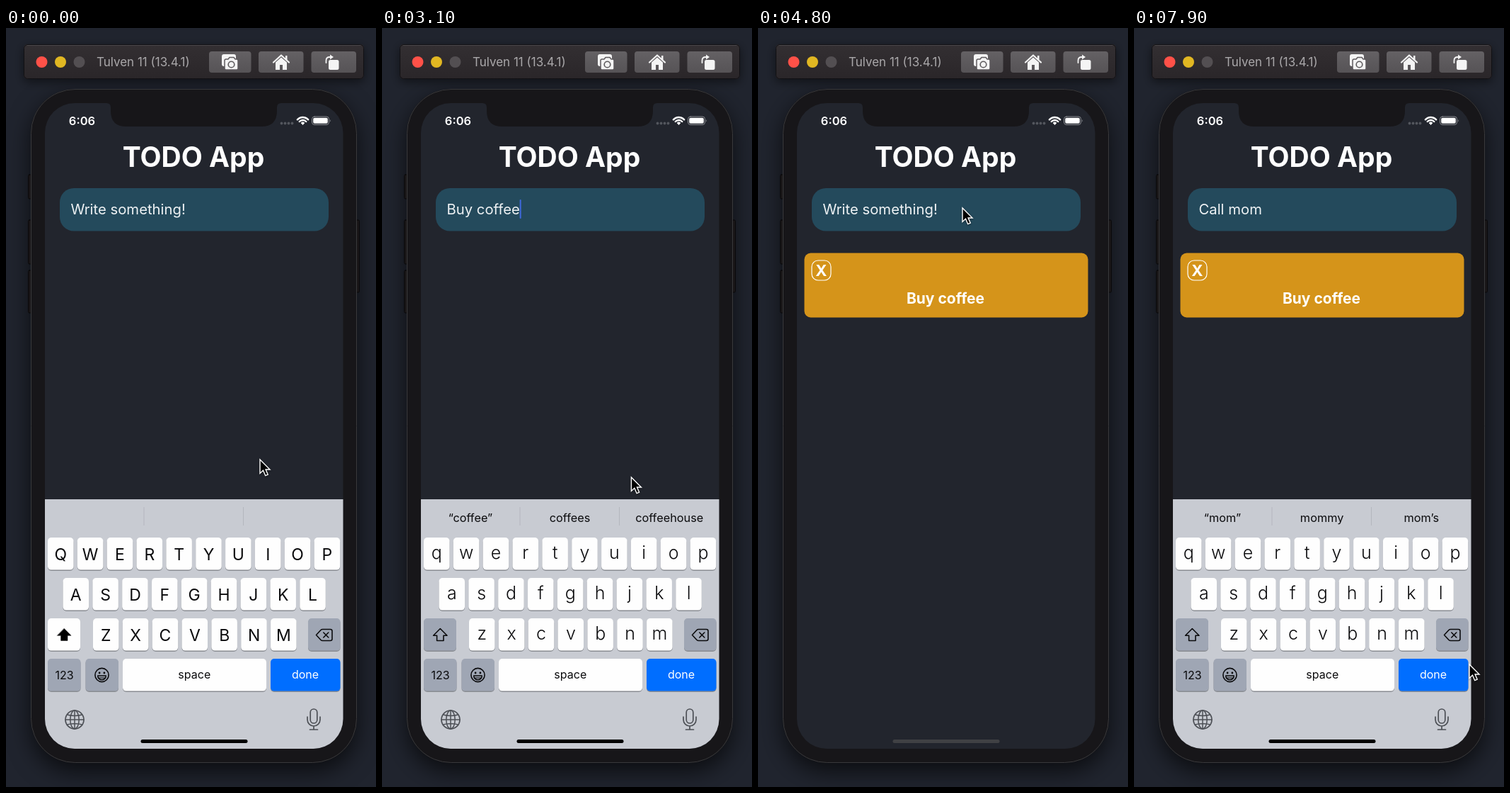
Write an HTML page with a canvas that moves like this. It is 523x1071 px and loops after 8 s.

```html
<!DOCTYPE html>
<html lang="en">
<head>
<meta charset="utf-8">
<title>TODO App</title>
<style>
html, body { margin: 0; width: 100%; height: 100%; overflow: hidden; background: #20242e; }
canvas { display: block; width: 523px; height: 1071px; }
</style>
</head>
<body>
<canvas id="stage"></canvas>
<script>
const W = 523, H = 1071, LOOP = 8000, TICK = 100;
const canvas = document.getElementById('stage');
const ctx = canvas.getContext('2d');
const dpr = window.devicePixelRatio || 1;
canvas.width = W * dpr;
canvas.height = H * dpr;

const BEZEL = '#171619', SCREEN = '#22252d', INK = '#0b0b0d', GLYPH = '#4d5056';
const FOCUS = 5150, PRESS = 3700, SUBMIT = 3950;
const KB_TOP = 665, KB_HEIGHT = 352;

// time, text, suggestions, highlighted middle candidate
const typing = [
  [-700, '', ''],
  [700, 'B', '“B”|But|By'],
  [900, 'Bu', '“Bu”|But|Bud'],
  [1100, 'Buy', '“Buy”|Buying|Buyer'],
  [1400, 'Buy ', 'a|the|it'],
  [1900, 'Buy c', '“c”|can|could'],
  [2050, 'Buy co', '“co”|could|come'],
  [2200, 'Buy cof', '“cof”|cod|', true],
  [2450, 'Buy coff', '“coff”|coffee|coffees', true],
  [2650, 'Buy coffe', '“coffe”|coffee|coffees', true],
  [2860, 'Buy coffee', '“coffee”|coffees|coffeehouse'],
  [SUBMIT, '', ''],
  [FOCUS, '', ''],
  [5800, 'C', '“C”|Can|Call'],
  [6000, 'Ca', '“Ca”|Can|Call'],
  [6150, 'Cal', '“Cal”|Call|Called'],
  [6300, 'Call', '“Call”||'],
  [6600, 'Call ', 'me|the|you'],
  [6900, 'Call m', '“m”|me|my'],
  [7050, 'Call mo', '“mo”|mom|more'],
  [7200, 'Call mom', '“mom”|mommy|mom’s']
];

// time, x, y of the pointer tip
const pointer = [
  [0, 359, 609], [900, 316, 509], [2800, 316, 509], [3600, 431, 904],
  [4100, 431, 904], [4700, 289, 254], [4800, 289, 254], [5200, 302, 265],
  [5500, 302, 265], [6400, 304, 268], [7200, 304, 268], [7700, 478, 896], [7900, 474, 898]
];

const clamp = v => Math.max(0, Math.min(1, v));
const smooth = v => v * v * (3 - 2 * v);

function box(x, y, w, h, r, fill, stroke, line = 1) {
  ctx.beginPath();
  ctx.roundRect(x, y, w, h, r);
  paint(fill, stroke, line);
}

function paint(fill, stroke, line = 1) {
  if (fill) { ctx.fillStyle = fill; ctx.fill(); }
  if (stroke) { ctx.strokeStyle = stroke; ctx.lineWidth = line; ctx.stroke(); }
}

function dot(x, y, r, fill, stroke, line) {
  ctx.beginPath();
  ctx.arc(x, y, r, 0, Math.PI * 2);
  paint(fill, stroke, line);
}

function shape(d, fill, stroke, line = 1) {
  const p = new Path2D(d);
  if (fill) { ctx.fillStyle = fill; ctx.fill(p); }
  if (stroke) { ctx.strokeStyle = stroke; ctx.lineWidth = line; ctx.stroke(p); }
}

function text(s, x, y, size, color, weight = 400, align = 'center') {
  ctx.font = `${weight} ${size}px Inter, Roboto, sans-serif`;
  ctx.textAlign = align;
  ctx.fillStyle = color;
  ctx.fillText(s, x, y);
}

function vertical(y0, y1, a, b) {
  const g = ctx.createLinearGradient(0, y0, 0, y1);
  g.addColorStop(0, a);
  g.addColorStop(1, b);
  return g;
}

function withShadow(blur, dy, alpha, draw) {
  ctx.save();
  ctx.shadowColor = `rgba(0,0,0,${alpha})`;
  ctx.shadowBlur = blur * dpr;
  ctx.shadowOffsetY = dy * dpr;
  draw();
  ctx.restore();
}

function toolbar() {
  withShadow(14, 4, 0.5, () => box(25, 23, 481, 49, 5, vertical(23, 72, '#332f32', '#2a2629')));
  box(25.5, 23.5, 480, 48, 5, null, '#121114');
  shape('M30 24.5H501', null, '#4a474a');
  dot(50.5, 48, 8, '#ff5148');
  dot(77, 48, 8, '#e1b722');
  dot(103.5, 48, 8, '#534f52');
  text('Tulven 11 (13.4.1)', 128, 54, 17, '#aaa8aa', 400, 'left');
  for (const [x, w] of [[287, 59.5], [357, 63.5], [431.5, 63.5]]) {
    box(x, 33, w, 30, 4, vertical(33, 63, '#646164', '#565356'));
  }
  const ico = '#f4f4f4', gap = '#5d5a5d';
  // camera
  box(305, 37, 20, 17, 3, ico);
  shape('M309 46q0-2 2-2h3l2-2.5h6l2 2.5h2q2 0 2 2v11q0 2-2 2h-15q-2 0-2-2z', ico, gap, 1.5);
  dot(318.5, 51.5, 4.3, null, gap, 1.6);
  // house
  shape('M378 48.5L389 38.5L400 48.5', null, ico, 2.2);
  shape('M381 48.5L389 41.5L397 48.5V59H391V52H387V59H381z', ico);
  shape('M395 39h2.5v6h-2.5z', ico);
  // rotate
  box(456, 45, 14.5, 14, 2.5, ico);
  shape('M452.5 49V46Q452.5 41 457.5 41H459', null, ico, 1.8);
  shape('M458 37.5L463 41L458 44.5z', ico);
}

function phone() {
  for (const [x, y, h] of [[31.5, 207, 34], [31.5, 271, 62], [31.5, 342, 60], [494.5, 271, 102]]) {
    box(x, y, 5, h, 1.5, '#242022', '#0d0c0e');
  }
  withShadow(32, 12, 0.65, () => box(35, 86, 461, 951, 62, BEZEL));
  box(35.5, 86.5, 460, 950, 62, null, '#39393b');
  box(55, 106, 421.5, 911, 42, SCREEN);
  shape('M142 105V106q6 0 6 6v5q0 22 22 22h191q22 0 22-22v-5q0-6 6-6V105z', BEZEL);
}

function statusBar() {
  text('6:06', 107.5, 136.7, 16.5, '#fff', 600);
  for (let i = 0; i < 4; i++) dot(389.5 + i * 5, 134.5, 1.9, '#53565d');
  const a = -Math.PI * 0.76, b = -Math.PI * 0.24;
  for (const r of [10.5, 6.5]) {
    ctx.beginPath();
    ctx.arc(419.5, 136.5, r, a, b);
    paint(null, '#fff', 2.4);
  }
  ctx.beginPath();
  ctx.moveTo(419.5, 137);
  ctx.arc(419.5, 136.5, 3.8, a, b);
  ctx.closePath();
  paint('#fff');
  box(432.5, 125, 24, 11.5, 3.5, null, '#8b8d92');
  box(434.2, 126.7, 20.6, 8.1, 2, '#fff');
  shape('M458 128.7q1.7 2 0 4z', '#8b8d92');
}

function caretAlpha(age) {
  const p = (age % 1000) / 1000;
  if (p < 0.45) return 1;
  return p < 0.9 ? clamp((0.6 - p) / 0.15) : (p - 0.9) / 0.1;
}

function app(t, step) {
  const [since, value] = step;
  text('TODO App', 265, 196, 39, '#fff', 700);
  box(76, 226, 380, 60.5, 20, '#244a5c');
  text(value || 'Write something!', 91.5, 263, 20.3, '#eef2f4', 400, 'left');
  if (t < SUBMIT || t >= FOCUS) {
    const w = value ? ctx.measureText(value).width : 0;
    ctx.globalAlpha = caretAlpha(t - since);
    box(91.3 + w, 242, 2, 27, 1, '#3f69dd');
    ctx.globalAlpha = 1;
  }
  if (t >= SUBMIT) {
    box(65.5, 317.5, 401, 91, 9, '#d5941a');
    box(76, 328, 27, 28, 9, null, '#fff', 1.2);
    text('X', 89.3, 350, 22, '#fff', 700);
    text('Buy coffee', 265, 388.5, 21, '#fff', 700);
  }
}

function key(x, y, w, fill = '#fefefe') {
  box(x, y + 1.4, w, 45.6, 5, '#898c92');
  box(x, y, w, 45.6, 5, fill);
}

function letters(row, x, y, upper) {
  [...row].forEach((c, i) => {
    const left = x + i * 41.85;
    key(left, y, 36.5);
    if (upper) text(c, left + 18.3, y + 31.5, 23, INK);
    else text(c.toLowerCase(), left + 18.3, y + 30, 25, INK, 300);
  });
}

function suggestions(t, [since, , words, hot]) {
  if (hot) box(195.5, 671, 140.5, 40, 5, '#e7e8ec');
  else for (const x of [194.5, 335]) box(x, 676, 1, 26, 0, '#b3b6bd');
  words.split('|').forEach((word, i) => {
    let color = INK;
    if (hot && i === 1) {
      const q = (t - since) / 150;
      color = ctx.createLinearGradient(250, 0, 278, 0);
      color.addColorStop(0, `rgba(11,11,13,${clamp(q)})`);
      color.addColorStop(1, `rgba(11,11,13,${clamp(q - 0.7)})`);
    }
    text(word, 125 + i * 140.6, 697, 16.3, color);
  });
}

function emoji(x, y) {
  dot(x, y, 9.6, null, INK, 1.6);
  dot(x - 3.4, y - 3, 1.4, INK);
  dot(x + 3.4, y - 3, 1.4, INK);
  ctx.beginPath();
  ctx.arc(x, y + 1, 5.8, 0, Math.PI);
  ctx.closePath();
  paint(null, INK, 1.5);
  shape(`M${x - 5} ${y + 4}H${x + 5}`, null, INK, 1);
}

function globe(x, y) {
  dot(x, y, 13, null, GLYPH, 1.7);
  ctx.beginPath();
  ctx.ellipse(x, y, 6.2, 13, 0, 0, Math.PI * 2);
  paint(null, GLYPH, 1.5);
  shape(`M${x} ${y - 13}v26M${x - 13} ${y}h26M${x - 10.5} ${y - 7}q10.5 3 21 0M${x - 10.5} ${y + 7}q10.5-3 21 0`,
    null, GLYPH, 1.5);
}

function mic(x, y) {
  box(x - 4.8, y - 14, 9.6, 20, 4.8, null, GLYPH, 1.7);
  shape(`M${x - 9} ${y - 3}v4a9 9 0 0 0 18 0v-4M${x} ${y + 10}v5M${x - 5.5} ${y + 15}h11`, null, GLYPH, 1.7);
}

function keyboard(t, step) {
  const upper = !step[1], grey = '#9fa6b4';
  box(55, KB_TOP, 422, KB_HEIGHT + 2, 0, '#c8cbd2');
  suggestions(t, step);
  letters('QWERTYUIOP', 59, 719, upper);
  letters('ASDFGHJKL', 80.5, 776, upper);
  letters('ZXCVBNM', 123, 833, upper);
  key(59, 833, 46, upper ? '#fefefe' : grey);
  shape('M82.3 847.5L92 857.3H87V864.5H77.6V857.3H72.6z', upper ? '#000' : null, INK, upper ? 0.5 : 1.6);
  key(427, 833, 45.5, grey);
  shape('M438.5 856.5l6.5-7q1-1 2.5-1h11q2.5 0 2.5 2.5v11q0 2.5-2.5 2.5h-11q-1.5 0-2.5-1z', null, INK, 1.6);
  shape('M448.8 853l7 7m0-7l-7 7', null, INK, 1.6);
  key(59, 890, 46.5, grey);
  text('123', 82.5, 918.5, 16, INK);
  key(112.5, 890, 46.5, grey);
  emoji(135.5, 913);
  key(165, 890, 203);
  text('space', 266.3, 917.5, 16, INK);
  const pressed = t >= PRESS && t < SUBMIT;
  key(374, 890, 98.5, pressed ? '#fefefe' : '#006eff');
  text('done', 423, 917.5, 16, pressed ? INK : '#fff');
  globe(97, 976);
  mic(435, 975);
}

function keyboardOffset(t) {
  if (t < SUBMIT) return 0;
  const decay = start => Math.exp(-8 * (t - start) / 1000);
  return KB_HEIGHT * (t < FOCUS ? 1 - decay(SUBMIT) : decay(FOCUS));
}

function cursor(t) {
  let i = pointer.findIndex(p => p[0] > t);
  if (i < 0) i = pointer.length - 1;
  const [t0, x0, y0] = pointer[i - 1], [t1, x1, y1] = pointer[i];
  const k = smooth(clamp((t - t0) / (t1 - t0)));
  ctx.save();
  ctx.translate(x0 + (x1 - x0) * k, y0 + (y1 - y0) * k);
  ctx.shadowColor = 'rgba(0,0,0,.35)';
  ctx.shadowBlur = 3 * dpr;
  ctx.shadowOffsetY = dpr;
  ctx.lineJoin = 'miter';
  shape('M0 0V19.5L4.5 15.3L7.7 22.7L11.2 21.2L8.1 14H14z', '#000', '#fff', 1.4);
  ctx.restore();
}

function draw(t) {
  const step = typing.findLast(s => s[0] <= t);
  const dy = keyboardOffset(t);
  const shown = dy < KB_HEIGHT - 2;
  ctx.setTransform(dpr, 0, 0, dpr, 0, 0);
  ctx.lineJoin = ctx.lineCap = 'round';
  ctx.fillStyle = '#20242e';
  ctx.fillRect(0, 0, W, H);
  phone();
  toolbar();
  statusBar();
  app(t, step);
  if (shown) {
    ctx.save();
    ctx.beginPath();
    ctx.roundRect(55, 106, 421.5, 911, 42);
    ctx.clip();
    ctx.translate(0, dy);
    keyboard(t, step);
    ctx.restore();
  }
  box(190.5, 1004, 151, 5, 2.5, shown ? '#000' : '#404144');
  cursor(t);
}

let last = -1;
function loop() {
  const t = Math.floor(performance.now() % LOOP / TICK) * TICK;
  if (t !== last) draw(last = t);
  requestAnimationFrame(loop);
}
loop();
</script>
</body>
</html>
```
